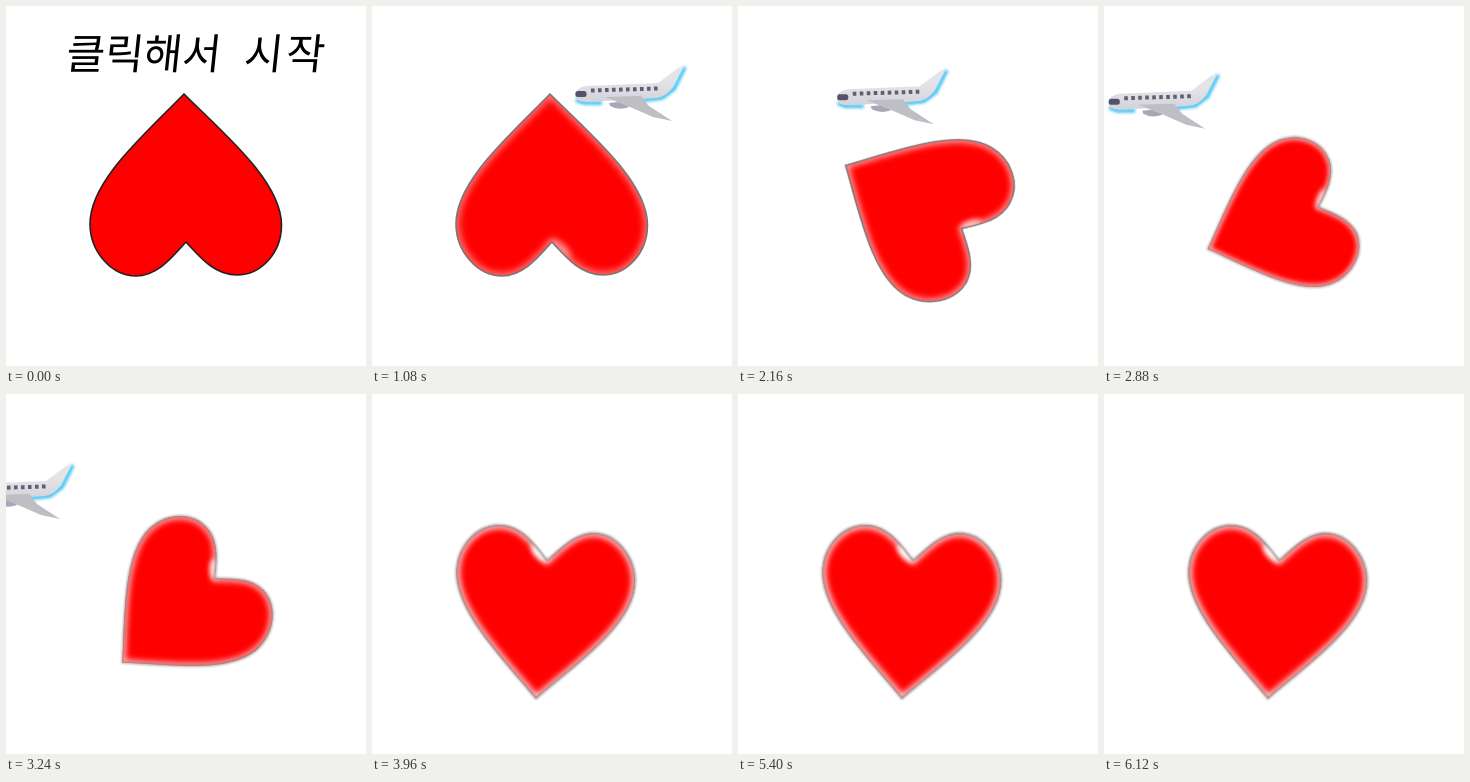
Write an HTML page that moves like this. It is 360 px wide and 360 px high and loops after 6480 ms.

```html
<!DOCTYPE html>
<html lang="ko">
<head>
<meta charset="utf-8">
<style>
  html, body { margin: 0; width: 100%; height: 100%; overflow: hidden; background: #fff; }
  svg { display: block; width: 100vw; height: 100vh; }
  text { font: 500 42px "Noto Sans CJK KR", "Noto Sans CJK", sans-serif; }
</style>
</head>
<body>
<svg viewBox="0 0 360 360">
  <defs>
    <path id="shape" d="M178 88C217 127 275.5 175 275.5 219C275.5 247 255 269 231 269C208 269 193 250 180 236C167 250 152 270 130 270C106 270 84 246 84 218C84 175 137 130 178 88Z"/>
    <clipPath id="inside"><use href="#shape"/></clipPath>
    <filter id="glow" x="-20%" y="-20%" width="140%" height="140%"><feGaussianBlur stdDeviation="3.5"/></filter>
    <filter id="spot" x="-100%" y="-150%" width="300%" height="400%"><feGaussianBlur stdDeviation="3"/></filter>
    <filter id="soft" x="-20%" y="-20%" width="140%" height="140%"><feGaussianBlur id="edgeBlur" stdDeviation="0.5"/></filter>
    <filter id="haze" x="-20%" y="-40%" width="140%" height="180%"><feGaussianBlur stdDeviation="0.7"/></filter>
    <filter id="rim" x="-30%" y="-30%" width="160%" height="160%"><feGaussianBlur stdDeviation="1.4"/></filter>
    <linearGradient id="metal" x1="0" y1="0" x2="0" y2="1">
      <stop offset=".4" stop-color="#e4e4e8"/><stop offset="1" stop-color="#d2d2da"/>
    </linearGradient>
  </defs>

  <g id="heart">
    <use href="#shape" fill="#f00"/>
    <g id="fade" clip-path="url(#inside)">
      <use href="#shape" fill="none" stroke="#fff" stroke-width="6" filter="url(#glow)"/>
      <ellipse cx="189" cy="243" rx="12" ry="5" transform="rotate(42 189 243)" fill="#fff" filter="url(#spot)"/>
    </g>
    <use id="edge" href="#shape" fill="none"/>
  </g>

  <g id="plane">
    <path d="M230 97L212 97L204 94M264 95L290 92L302 83L313 61" fill="none" stroke="#35bdf2" stroke-width="3.5" filter="url(#rim)"/>
    <g filter="url(#haze)">
      <path d="M237 97L254 95L257 101Q247 105 238 100Z" fill="#aaa6b8"/>
      <path d="M203 89Q203 82 214 80L286 77L306 62L312 60L300 82Q294 91 284 92L215 96Q203 96 203 89Z" fill="url(#metal)"/>
      <path d="M233 91L269 90L277 100L300 115L281 111L258 101Z" fill="#bebec5"/>
      <rect x="203.5" y="85" width="11" height="6" rx="2.5" fill="#55516a"/>
      <path d="M219 84.5L286 82.5" stroke="#625e72" stroke-width="4" stroke-dasharray="3.6 3.4"/>
    </g>
  </g>

  <text id="title" transform="translate(59 63) skewX(-6)">클릭해서<tspan x="178" letter-spacing="3">시작</tspan></text>
</svg>
<script>
  const STEP = 360, LOOP = 6480;
  const el = id => document.getElementById(id);

  // Key poses, each starting with its step.
  // Heart: centre x, centre y, counter-clockwise angle, scale
  const heartKeys = [
    [3, 179, 162, 0, 1], [5, 169, 175.5, 36, 0.94],
    [8, 159, 222, 110, 0.8], [11, 169.5, 235.5, 174.6, 0.935]
  ];
  // Plane: offset x, offset y
  const planeKeys = [[1, 88, 0], [3, 0, 0], [5, -57, 1], [9, -246, 10]];

  // Linear blend between the key poses around a step, held at both ends
  function pose(keys, step) {
    const next = keys.findIndex(key => key[0] > step);
    if (next < 1) return keys.at(next).slice(1);
    const a = keys[next - 1], b = keys[next];
    const k = (step - a[0]) / (b[0] - a[0]);
    return a.map((v, i) => v + (b[i] - v) * k).slice(1);
  }

  function draw(now) {
    const step = Math.floor(now % LOOP / STEP);
    const [x, y, angle, scale] = pose(heartKeys, step);
    el("heart").setAttribute("transform",
      `translate(${x} ${y}) rotate(${-angle}) scale(${scale}) translate(-179 -162)`);

    // The outline and rim soften as the loop goes on
    const wear = Math.min(step / 11, 1);
    el("fade").setAttribute("opacity", Math.min(2 * wear, 0.4 + 0.6 * wear));
    el("edge").setAttribute("stroke", step ? "#777" : "#222");
    el("edge").setAttribute("stroke-width", 1.6);
    el("edge").setAttribute("filter", step ? "url(#soft)" : "none");
    el("edgeBlur").setAttribute("stdDeviation", 0.3 + wear);

    const flying = step >= 1 && step <= 9;
    el("plane").setAttribute("visibility", flying ? "visible" : "hidden");
    el("plane").setAttribute("transform", `translate(${pose(planeKeys, step)})`);
    el("title").setAttribute("visibility", step ? "hidden" : "visible");
    requestAnimationFrame(draw);
  }
  draw(0);
</script>
</body>
</html>
```
